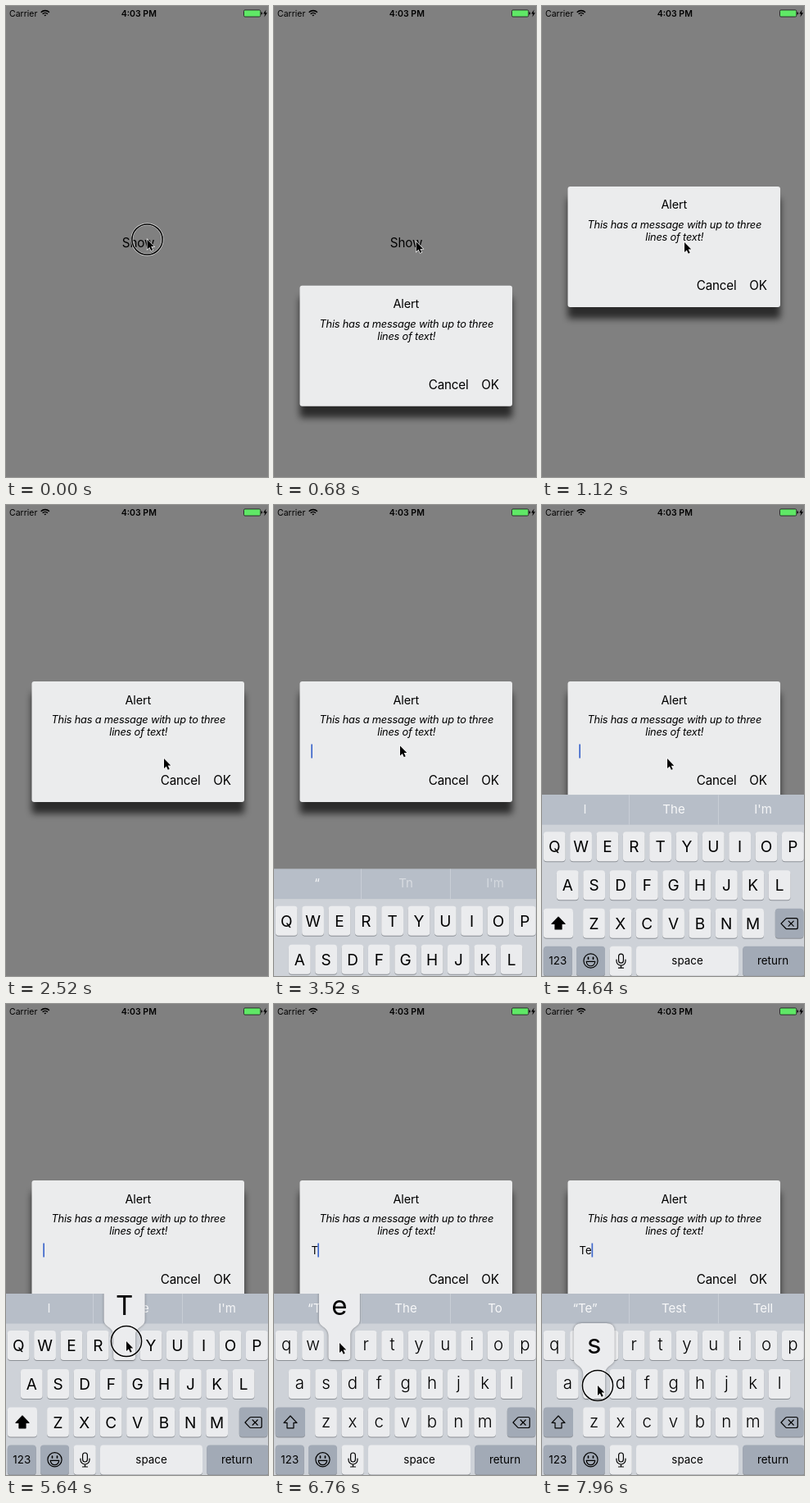
These frames come from a looping animation (320 by 574 pixels, 8000 ms). An HTML page:

```html
<!DOCTYPE html>
<html lang="en">
<head>
<meta charset="utf-8">
<title>Alert with text field</title>
<style>
  html, body { margin: 0; width: 100%; height: 100%; overflow: hidden; background: #808080; }
  svg { display: block; width: 100vw; height: 100vh; }
  text { font-family: Inter, Roboto, "Liberation Sans", sans-serif; white-space: pre; }
  .mid { text-anchor: middle; }
  .label { letter-spacing: -.15px; }
  .line { fill: none; stroke: #000; stroke-linecap: round; stroke-linejoin: round; }
  #popup { filter: drop-shadow(0 .5px 1.5px rgba(0, 0, 0, .4)); }
</style>
</head>
<body>
<svg id="stage" viewBox="0 0 320 574">
  <defs>
    <filter id="soft" x="-20%" y="-30%" width="140%" height="160%"><feGaussianBlur stdDeviation="4.2"/></filter>
    <clipPath id="board"><rect width="320" height="222"/></clipPath>
  </defs>
  <rect width="320" height="574" fill="#808080"/>
  <text class="mid label" x="161.5" y="294" font-size="15.2">Show</text>

  <g id="dialog">
    <rect x="31.5" y="14" width="259.5" height="147" rx="3" opacity=".66" filter="url(#soft)"/>
    <rect x="31.5" width="259.5" height="147" rx="3" fill="#ebeced"/>
    <text class="mid label" x="161.3" y="27.5" font-size="14.5">Alert</text>
    <g class="mid" font-size="12.8" font-style="italic" letter-spacing="-.2">
      <text x="161.8" y="51">This has a message with up to three</text>
      <text x="161.8" y="66">lines of text!</text>
    </g>
    <g class="label" font-size="15.2">
      <text x="188.7" y="126">Cancel</text>
      <text x="253.2" y="126">OK</text>
    </g>
    <text id="typed" x="45.5" y="89.7" font-size="13"></text>
    <rect id="caret" y="76.5" width="1.7" height="17" fill="#3f68cc"/>
  </g>

  <g id="keyboard">
    <rect width="320" height="230" fill="#ced2d8"/>
    <rect width="320" height="36.5" fill="#b7bec8"/>
    <path d="M106.5 0v36.5M215.5 0v36.5" stroke="#c8ced6"/>
    <g id="hints" class="mid" fill="#fff" font-size="15"></g>
    <g id="keys"></g>
    <g clip-path="url(#board)"><g id="popup"><path fill="#ebecee"/><text class="mid" font-size="33"></text></g></g>
  </g>

  <text x="4" y="12.8" font-size="10.5">Carrier</text>
  <text class="mid" x="162.3" y="12.8" font-size="10.5" font-weight="600">4:03 PM</text>
  <g class="line" stroke-width="1.6" style="stroke-linecap:butt">
    <path d="M42.7 7.7a7.2 7.2 0 0 1 10.2 0M44.7 9.8a4.4 4.4 0 0 1 6.2 0"/>
    <path d="M46.3 11L47.8 12.6 49.3 11q-1.5-1-3 0z" fill="#000" stroke="none"/>
  </g>
  <rect x="290.5" y="4.9" width="20.3" height="8.2" rx="1.4" fill="#5fe866" stroke="#222" stroke-width=".9"/>
  <path d="M311.6 7.3q1.5.3 1.5 1.7t-1.5 1.7zM317.6 4.6l-3.4 4.9h2.1l-.9 3.9 3.7-5.2h-2.2z"/>

  <g id="touch" fill="none">
    <circle r="18.6" stroke="#fff" stroke-width="2.8" opacity=".75"/>
    <circle r="18.6" stroke="#000" stroke-width="1.5"/>
  </g>
  <path id="pointer" d="M0 0V12l2.8-2.6 2 4.3 1.9-.9-2-4.2H8.3z" stroke="#fff" stroke-width="1.2" paint-order="stroke"/>
</svg>
<script>
const LOOP = 8000;
const $ = id => document.getElementById(id);
const KEY_H = 36, KEY_W = 26.8, PITCH = 32.35;
const ROWS = [
  { letters: 'QWERTYUIOP', x: 1.8, y: 45 },
  { letters: 'ASDFGHJKL', x: 17.9, y: 92 },
  { letters: 'ZXCVBNM', x: 50.1, y: 138.5 }
];
const BOTTOM = 184.5;
const LIGHT = '#ebecee', DARK = '#a2aab6';

const keyCap = (x, y, w, fill = LIGHT, id = '') =>
  `<rect x="${x}" y="${y + 1}" width="${w}" height="${KEY_H}" rx="4" fill="#8c9096"/>
   <rect ${id} x="${x}" y="${y}" width="${w}" height="${KEY_H}" rx="4" fill="${fill}"/>`;
const label = (x, y, s) => `<text class="mid" x="${x}" y="${y}">${s}</text>`;

function buildKeys() {
  const places = {};
  let caps = '', upper = '', lower = '';
  for (const { letters, x, y } of ROWS) {
    [...letters].forEach((c, i) => {
      const left = x + i * PITCH, mid = left + KEY_W / 2;
      places[c] = { x: mid, y };
      caps += keyCap(left, y, KEY_W);
      upper += label(mid, y + 25.2, c);
      lower += label(mid, y + 24, c.toLowerCase());
    });
  }
  const shiftY = ROWS[2].y;
  caps += keyCap(1.8, shiftY, 36.2, LIGHT, 'id="shift"') + keyCap(284.8, shiftY, 34.6, DARK)
    + keyCap(1.8, BOTTOM, 35, DARK) + keyCap(42, BOTTOM, 35, DARK) + keyCap(82.6, BOTTOM, 27.2)
    + keyCap(115, BOTTOM, 125) + keyCap(245.2, BOTTOM, 76, DARK);
  $('keys').innerHTML = `${caps}
    <g id="upper" font-size="19">${upper}</g>
    <g id="lower" font-size="20.5" font-weight="300">${lower}</g>
    <g class="line" stroke-width="1.2">
      <path id="arrow" d="M20 149l8 8.3h-4v6.5h-8v-6.5h-4z"/>
      <path d="M292 157l5.6-5.8q.7-.7 1.7-.7h11q2 0 2 2v9q0 2-2 2h-11q-1 0-1.7-.7zM301.2 154l6 6m0-6l-6 6"/>
      <circle cx="59.5" cy="202.3" r="8.6"/>
      <path d="M54.2 203.3h10.6q-.8 5.3-5.3 5.3t-5.3-5.3z"/>
      <path d="M56.5 198.2v1.8m6-1.8v1.8" stroke-width="1.7"/>
      <rect x="93.6" y="194" width="5.8" height="11" rx="2.9"/>
      <path d="M91 201v1.5a5.5 5.5 0 0 0 11 0V201M96.5 208v3m-3 0h6"/>
    </g>
    <g font-size="13.4">${label(19.3, BOTTOM + 22.7, '123')}${label(177.5, BOTTOM + 22.2, 'space')}${label(282, BOTTOM + 22.2, 'return')}</g>`;
  return places;
}

const places = buildKeys();
$('hints').innerHTML = [52.5, 161, 270].map(x => label(x, 22.5, '')).join('');

// [time, x, y] of the pointer tip
const PATH = [
  [0, 172.5, 284.5], [480, 172.5, 284.5], [760, 174, 288], [1440, 174, 288], [2160, 193, 309],
  [2520, 193, 309], [2960, 154, 293.5], [4440, 154, 293.5], [5320, 147, 411], [5840, 147, 411],
  [6440, 80, 413], [6840, 80, 413], [7640, 68, 465], [8000, 68, 465]
];
const TOUCHES = [[0, 200], [2960, 3160], [5480, 5720], [6520, 6760], [7800, 8000]];
const PRESSES = [[5520, 5760, 'T'], [6560, 6800, 'E'], [7840, 8000, 'S']];
const TYPED = [[0, '', 0], [5760, 'T', 8], [6800, 'Te', 15.2]];
const HINTS = [
  [0, ['“', 'Tn', "I'm"], [.85, .45, .4]],
  [3600, ['I', 'The', "I'm"], [.8, .9, .85]],
  [5760, ['“T”', 'The', 'To'], [.9, .9, .9]],
  [6800, ['“Te”', 'Test', 'Tell'], [.9, .9, .9]]
];

const current = (table, t) => table.filter(row => row[0] <= t).pop();
const within = (table, t) => table.find(([from, to]) => t >= from && t < to);
const show = (id, on) => $(id).setAttribute('display', on ? 'inline' : 'none');
const move = (id, x, y) => $(id).setAttribute('transform', `translate(${x.toFixed(2)} ${y.toFixed(2)})`);

// Critically damped spring from one value to another
function spring(t, start, rate, from, to) {
  const x = Math.max(0, t - start) / 1000 * rate;
  return to + (from - to) * (1 + x) * Math.exp(-x);
}

function pointerAt(t) {
  const i = PATH.findIndex(p => p[0] > t);
  const [t0, x0, y0] = PATH[i - 1], [t1, x1, y1] = PATH[i];
  const u = (t - t0) / (t1 - t0), e = u * u * (3 - 2 * u);
  return [x0 + (x1 - x0) * e, y0 + (y1 - y0) * e];
}

function drawPopup(letter, lower) {
  show('popup', !!letter);
  if (!letter) return;
  const { x, y } = places[letter], [shape, text] = $('popup').children;
  shape.setAttribute('d', `M${x - 25} ${y - 46}q0-10 10-10h30q10 0 10 10v33c0 9-11.6 8-11.6 19v26q0 4-4 4h-18.8q-4 0-4-4v-26c0-11-11.6-10-11.6-19z`);
  text.setAttribute('x', x);
  text.setAttribute('y', y - 19.5);
  text.textContent = lower ? letter.toLowerCase() : letter;
}

function render(t) {
  move('dialog', 0, t < 440 ? 600 : spring(t, 440, 9.2, 574, 215));
  move('keyboard', 0, spring(t, 3227, 6.75, 574, 353));

  const [, typed, width] = current(TYPED, t);
  $('typed').textContent = typed;
  $('caret').setAttribute('x', 45.3 + width);
  show('caret', t >= 3240);

  const [, words, alphas] = current(HINTS, t);
  [...$('hints').children].forEach((el, i) => {
    el.textContent = words[i];
    el.setAttribute('opacity', alphas[i]);
  });

  const lower = typed !== '';
  show('upper', !lower);
  show('lower', lower);
  $('shift').setAttribute('fill', lower ? DARK : LIGHT);
  $('arrow').style.fill = lower ? 'none' : '#000';
  drawPopup(within(PRESSES, t)?.[2], lower);

  const [x, y] = pointerAt(t);
  move('pointer', x, y);
  move('touch', x, y);
  show('touch', within(TOUCHES, t));
}

const start = performance.now();
function tick() {
  render((performance.now() - start) % LOOP);
  requestAnimationFrame(tick);
}
tick();
</script>
</body>
</html>
```
